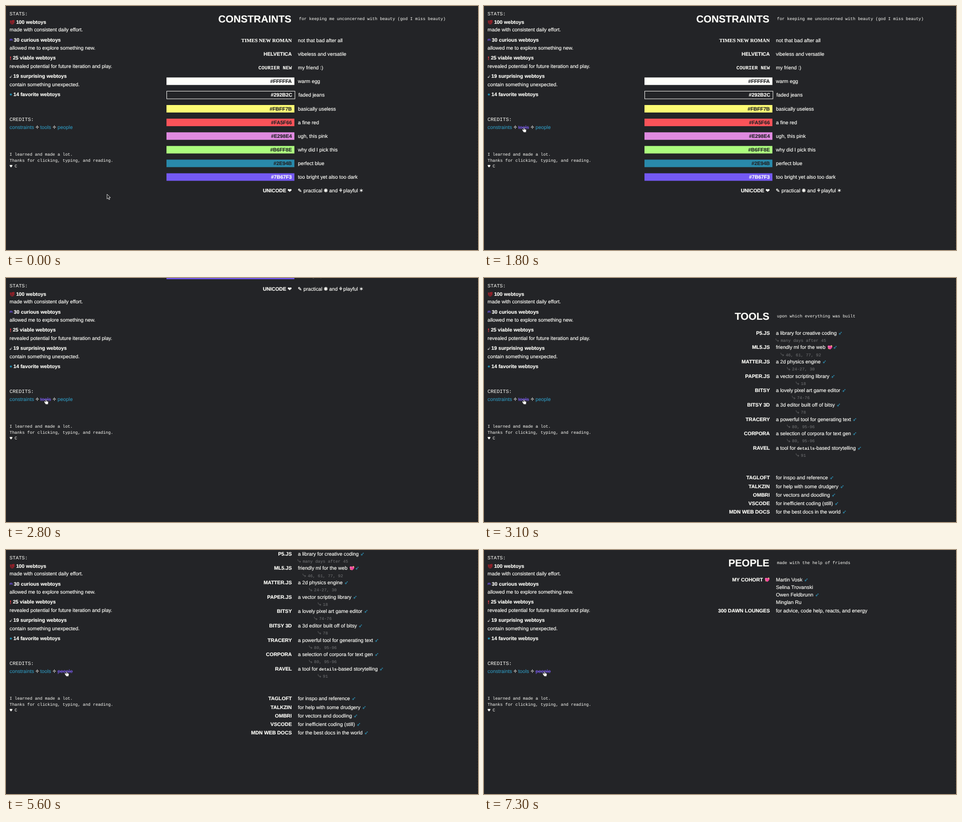
An HTML page for the animation above (7400 ms loop, 1000 px wide and 520 px high).

```html
<!DOCTYPE html>
<html lang="en">
<head>
<meta charset="utf-8">
<title>Credits</title>
<style>
  html, body { margin: 0; width: 100%; height: 100%; overflow: hidden; background: #232427; }
  svg { display: block; width: 1000px; height: 520px; }
  text {
    font: 10.72px "Liberation Sans", "DejaVu Sans", sans-serif;
    color: #fffffa; fill: currentColor; stroke: currentColor; stroke-width: .18px;
    white-space: pre; text-rendering: geometricPrecision;
  }
  tspan { fill: currentColor; stroke: currentColor; }
  .bold { font-weight: 700; }
  .end { text-anchor: end; }
  .title { font-size: 21.44px; font-weight: 700; text-anchor: end; }
  .serif { font-family: "Liberation Serif", serif; }
  .mono { font-family: "Liberation Mono", monospace; }
  .small { font-family: "Liberation Mono", monospace; font-size: 8.93px; }
  .mono, .small { stroke: none; }
  .sign { font-family: "DejaVu Sans", sans-serif; }
  .link { color: #2e8fb3; }
  .link.active { color: #7b5cf3; }
  .link.hover { text-decoration: line-through; stroke: none; }
  .dark { color: #232427; }
  .note { color: #747577; }
</style>
</head>
<body>
<svg id="stage" viewBox="0 0 1000 520"></svg>
<script>
const LOOP = 7400;
const PAGE_TOPS = [0, 1010, 2070];
const LABEL_X = 605.6, TEXT_X = 618.5;

const text = (x, y, content, cls = "", attrs = "") =>
  `<text x="${x}" y="${y}" class="${cls}" ${attrs}>${content}</text>`;
const arrow = '<tspan class="sign link"> ➶</tspan>';

const heart = (x, y) => `<g transform="translate(${x} ${y})">
  <path d="M0 5C-8 0-5-6 0-3C5-6 8 0 0 5Z" fill="#f0449c"/>
  <path d="M-1-2C-3-3-4-1-3 0" fill="none" stroke="#ffa7d2"/>
  <path d="M3-5l.6 1.5 1.5.6-1.5.6L3-.8l-.6-1.5-1.5-.6 1.5-.6ZM-3 1l.5 1.2 1.2.5-1.2.5-.5 1.2-.5-1.2-1.2-.5 1.2-.5Z" fill="#ffe27a"/></g>`;

const heading = (title, subtitle) =>
  text(604.6, 34.5, title, "title") + text(620.8, 29.7, subtitle, "small");

// y is the vertical middle of the row
const row = (y, label, description, cls = "") =>
  text(LABEL_X, y + 3.9, label, "bold end " + cls) + text(TEXT_X, y + 3.9, description);

function sidebar() {
  const stats = [
    [21.4, 37.9, "100 webtoys", "made with consistent daily effort."],
    [16.6, 75.6, "30 curious webtoys", "allowed me to explore something new."],
    [14.4, 114.3, "25 viable webtoys", "revealed potential for future iteration and play."],
    [15.6, 153, "19 surprising webtoys", "contain something unexpected."],
    [15.8, 191.9, "14 favorite webtoys", ""],
  ];
  const icons = `
    <g transform="translate(8 35.5) rotate(-8)">
      ${text(0, 0, "100", "bold", 'style="font-size:6.2px;font-style:italic;color:#d8202c"')}
      <path d="M1 2L10 1M3 4L8 3.2" stroke="#d8202c" fill="none"/></g>
    <path d="M8.5 74.5V70.5H13V74.5M8 72.5H13.5" stroke="#7459f3" stroke-width=".9" fill="none"/>
    <path d="M9.6 107.5V112M9.6 113.3V115" stroke="#e5414a" stroke-width="1.8"/>
    <path d="M8 153L12.5 147.5M9.5 153L12.5 150" stroke="#a5a6a6" fill="none"/>
    <circle cx="9" cy="152" r="1.2" fill="#c8c8c6"/>
    <circle cx="10.3" cy="188.6" r="2.2" fill="#238bab"/>`;
  return text(7.6, 20.4, "STATS:", "mono")
    + stats.map(([x, y, title, body], i) =>
        text(x, y, title, "bold") + text(7.6, 53.8 + 38.9 * i, body)).join("")
    + icons
    + text(7.6, 244.6, "CREDITS:", "mono")
    + text(7.6, 262, "constraints", "link")
    + text(61.8, 262, "✧", "sign")
    + text(72.6, 262, "tools", "link", 'id="tools"')
    + text(98, 262, "✧", "sign")
    + text(109.2, 262, "people", "link", 'id="people"')
    + text(7.6, 319, "I learned and made a lot.", "small")
    + text(7.6, 331.5, "Thanks for clicking, typing, and reading.", "small")
    + text(7.2, 344, "♥", "sign", 'style="font-size:7.5px"')
    + text(18.2, 344, "C", "small");
}

function constraintsPage() {
  const fonts = [
    ["TIMES NEW ROMAN", "not that bad after all", "serif"],
    ["HELVETICA", "vibeless and versatile", ""],
    ["COURIER NEW", "my friend :)", "mono"],
  ];
  const swatches = [
    ["#FFFFFA", "warm egg", "#fffffa"],
    ["#292B2C", "faded jeans", "none"],
    ["#FBFF7B", "basically useless", "#fdfc74"],
    ["#FA5F66", "a fine red", "#fb5359"],
    ["#E298E4", "ugh, this pink", "#df8ae0"],
    ["#B6FF8E", "why did I pick this", "#acfd7e"],
    ["#2E94B", "perfect blue", "#2989aa"],
    ["#7B67F3", "too bright yet also too dark", "#7459f3"],
  ];
  const swatch = ([label, description, color], i) => {
    const y = 160.3 + 29.1 * i + (i > 1 ? .5 : 0);
    if (color === "none") {
      return `<rect x="340.5" y="${y - 7.9}" width="271.6" height="16.4" fill="none" stroke="#fffffa"/>`
        + text(606.4, y + 4, label, "bold end") + text(619.6, y + 4, description);
    }
    return `<rect x="340" y="${y - 8}" width="271" height="16" fill="${color}"/>`
      + row(y, label, description, color === "#7459f3" ? "" : "dark");
  };
  const unicode = [[618, "✎"], [673, "✺"], [704.3, "⚘"], [748.2, "✶"]];
  const words = [[630.2, "practical"], [684.8, "and"], [714.6, "playful"]];
  return heading("CONSTRAINTS", "for keeping me unconcerned with beauty (god I miss beauty)")
    + fonts.map((font, i) => row(73.5 + 29 * i, ...font)).join("")
    + swatches.map(swatch).join("")
    + row(393.3, 'UNICODE <tspan class="sign">❤</tspan>', "")
    + unicode.map(([x, sign]) => text(x, 397.2, sign, "sign")).join("")
    + words.map(([x, word]) => text(x, 397.2, word)).join("");
}

function toolsPage() {
  const libraries = [
    ["P5.JS", "a library for creative coding", "many days after 45"],
    ["ML5.JS", "friendly ml for the web", "46, 61, 77, 92"],
    ["MATTER.JS", "a 2d physics engine", "24-27, 30"],
    ["PAPER.JS", "a vector scripting library", "18"],
    ["BITSY", "a lovely pixel art game editor", "74-76"],
    ["BITSY 3D", "a 3d editor built off of bitsy", "78"],
    ["TRACERY", "a powerful tool for generating text", "80, 95-96"],
    ["CORPORA", "a selection of corpora for text gen", "80, 95-96"],
    ["RAVEL", 'a tool for <tspan class="small bold">details</tspan>-based storytelling', "91"],
  ];
  const helpers = [
    ["TAGLOFT", "for inspo and reference"],
    ["TALKZIN", "for help with some drudgery"],
    ["OMBRI", "for vectors and doodling"],
    ["VSCODE", "for inefficient coding (still)"],
    ["MDN WEB DOCS", "for the best docs in the world"],
  ];
  const library = ([label, description, days], i) => {
    const y = 62.9 + 30.62 * i;
    const noteX = 671.3 - (days.length + 2) * 2.68;
    const extra = label === "ML5.JS"
      ? heart(733, y) + text(739.6, y + 3.9, "➶", "sign link") : "";
    return row(y, label, description + (extra ? "" : arrow)) + extra
      + `<path d="M${noteX + .5} ${y + 12}q0 5 6 5m-2.2-2.2l2.2 2.2l-2.2 2.2" fill="none" stroke="#747577" stroke-width=".8"/>`
      + text(noteX + 10.72, y + 19, days, "small note");
  };
  return heading("TOOLS", "upon which everything was built")
    + libraries.map(library).join("")
    + helpers.map(([label, description], i) =>
        row(371.5 + 18.2 * i, label, description + arrow)).join("");
}

function peoplePage() {
  const friends = ["Martin Vosk" + arrow, "Selina Trovanski", "Owen Feldbrunn" + arrow, "Minglan Ru"];
  return heading("PEOPLE", "made with the help of friends")
    + text(591, 66.8, "MY COHORT", "bold end") + heart(600, 63)
    + friends.map((name, i) => row(62.9 + 16.15 * i, "", name)).join("")
    + row(129.5, "300 DAWN LOUNGES", "for advice, code help, reacts, and energy");
}

const pages = [constraintsPage(), toolsPage(), peoplePage()];
const stage = document.getElementById("stage");
stage.innerHTML = `
  <rect width="1000" height="520" fill="#232427"/>
  <path d="M998.5 0V520" stroke="#18191b" stroke-dasharray="3 3"/>
  <g id="scroller">${pages.map((page, i) =>
    `<g transform="translate(0 ${PAGE_TOPS[i]})">${page}</g>`).join("")}</g>
  ${sidebar()}
  <g id="cursor" stroke-linejoin="round">
    <path id="pointer" d="M0 0V10.2L2.5 8L4.1 11.7L5.8 11L4.2 7.4H7.3Z" fill="#1b1b1d" stroke="#f2f2f2" stroke-width=".9"/>
    <path id="hand" transform="scale(.9)" d="M-.9 1Q0-.6 1 1L1.7 4.3L4.6 5Q6 5.4 5.8 7L5 11.7H-.4L-3.8 7.4Q-4-.2-.4 6.6Z" fill="#fff" stroke="#222" stroke-width=".8"/>
    <g id="beam" fill="none"><path d="M-2.5-6Q0-6 0-4.5Q0-6 2.5-6M0-5V5M-2.5 6Q0 6 0 4.5Q0 6 2.5 6M-1.5 2H1.5" stroke="#eee" stroke-width="1.8"/>
      <path d="M0-5V5" stroke="#333" stroke-width=".6"/></g>
  </g>`;

const part = id => document.getElementById(id);
const progress = (t, start, duration) => Math.min(1, Math.max(0, (t - start) / duration));
const smooth = p => p * p * (3 - 2 * p);

// cubic-bezier(.42, 0, .58, 1)
function easeInOut(p) {
  let low = 0, high = 1;
  for (let i = 0; i < 24; i++) {
    const s = (low + high) / 2, r = 1 - s;
    if (1.26 * s * r * r + 1.74 * s * s * r + s * s * s < p) low = s; else high = s;
  }
  return p <= 0 ? 0 : p >= 1 ? 1 : smooth(low);
}

function scrollAt(t) {
  const first = easeInOut(progress(t, 2497, 722));
  const second = easeInOut(progress(t, 5486, 720));
  return Math.ceil(first * PAGE_TOPS[1] + second * (PAGE_TOPS[2] - PAGE_TOPS[1]));
}

function draw(t) {
  const toLinks = smooth(progress(t, 1080, 520));
  const toPeople = smooth(progress(t, 3870, 520));
  const x = 214 - 129.4 * toLinks + 43.5 * toPeople;
  const y = 401 - 142.4 * toLinks;
  const inRow = y > 250 && y < 266;
  const onTools = inRow && x > 72 && x < 96;
  const onPeople = inRow && x > 109 && x < 142;
  const hand = onTools || onPeople;
  const beam = inRow && !hand && x < 142;

  part("scroller").setAttribute("transform", `translate(0 ${-scrollAt(t)})`);
  part("cursor").setAttribute("transform", `translate(${x} ${y})`);
  const show = (id, visible) => part(id).setAttribute("visibility", visible ? "visible" : "hidden");
  show("hand", hand);
  show("beam", beam);
  show("pointer", !hand && !beam);

  const mark = (id, hover, focused) => {
    part(id).classList.toggle("hover", hover);
    part(id).classList.toggle("active", hover || focused);
  };
  mark("tools", onTools, t >= 2450 && t < 5450);
  mark("people", onPeople, t >= 5450);
}

function tick() {
  draw(performance.now() % LOOP);
  requestAnimationFrame(tick);
}
tick();
</script>
</body>
</html>
```
